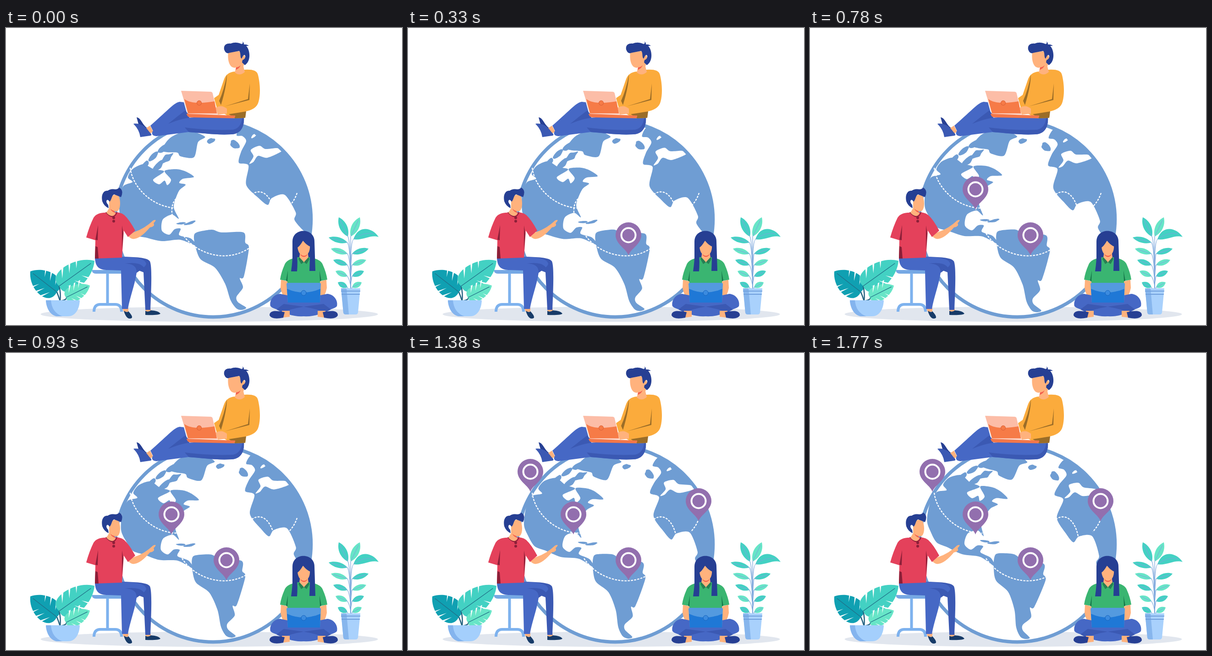
These frames come from a looping animation (864 px wide and 648 px high, 1.8 s). An HTML page:

```html
<!DOCTYPE html>
<html lang="en">
<head>
<meta charset="utf-8">
<title>Working around the globe</title>
<style>
html, body { margin: 0; width: 100%; height: 100%; overflow: hidden; background: #fff; }
svg { display: block; width: 100vw; height: 100vh; }
.skin { fill: #ffb27d; } .hair { fill: #263f93; } .pants { fill: #4668c5; } .fold { fill: #3b59b3; }
.blush { fill: #f4604d; } .ink { fill: #8b1f38; } .ochre { fill: #9b6d28; }
</style>
</head>
<body>
<svg viewBox="0 0 864 648" fill="none">
  <defs><clipPath id="disc"><circle cx="452" cy="417" r="215"/></clipPath></defs>

  <ellipse cx="443.5" cy="624.5" rx="368" ry="16.5" fill="#e1e6ee"/>
  <circle cx="452" cy="417" r="213.500" fill="#fff"/>
  <g clip-path="url(#disc)"><g id="land"></g></g>
  <circle cx="452" cy="417" r="213.500" stroke="#6f9dd3" stroke-width="7.500"/>
  <g stroke="#fff" stroke-width="2.300" stroke-dasharray="4.500 2.500">
    <path d="M271 305C276 348 320 393 376 393"/>
    <path d="M363 410Q358 382 375 369"/>
    <path d="M384 448C410 490 478 516 531 480"/>
    <path d="M536 363C559 347 579 368 585 400"/>
    <path d="M635 360Q630 376 617 390"/>
  </g>
  <g id="pins"></g>

  <g id="topMan">
    <path class="hair" d="M285 195C295 196 296 210 309 219L306 233L293 224Z"/>
    <path class="skin" d="M305 219L314 213L321 226L312 232Z"/>
    <path class="fold" d="M278 209C290 207 303 212 313 227Q321 234 314 235L293 238Q291 222 278 209Z"/>
    <path class="pants" d="M379 161C367 163 358 175 315 213L322 227L398 198L388 162Z"/>
    <path class="fold" d="M391 180Q372 194 354 209L402 202L398 188Z"/>
    <path class="pants" d="M519 193C521 216 512 231 492 232C459 234 425 229 398 227L328 236Q315 235 320 225Q380 194 412 195Z"/>
    <path class="fold" d="M519 196C520 216 512 231 492 232C459 234 431 229 399 227L390 217Q442 224 495 222Q513 218 515 197Z"/>
    <path d="M500 95C486 96 479 102 475 114L464 146L454 153L461 178L493 197L522 196L523 182C537 179 548 173 551 161C556 143 554 119 550 103C548 92 536 90 521 91Z" fill="#fbab3c"/>
    <path class="ochre" d="M482 101Q476 135 465 159L469 168Q482 125 482 101Z"/>
    <path class="ochre" d="M532 121L528 155L477 171L531 157ZM486 188L524 182L522 196L500 197Z"/>
    <path class="skin" d="M457 174Q470 166 482 176L482 187L462 189Z"/>
    <path d="M382 137L446 139Q450 139 451 143L461 188L397 187Z" fill="#fcbda7"/>
    <path d="M389 155C403 166 430 164 455 160L460 186L397 186Z" fill="#f67b47"/>
    <circle cx="421.500" cy="163.500" r="5" fill="#f67b47" stroke="#d75d35"/>
    <path d="M394 187L500 191Q501 195 496 197L402 195Q395 194 394 187Z" fill="#f3774a"/>
    <path class="skin" d="M485 53C483 67 486 80 493 85Q498 88 502 86L499 97Q510 106 521 96L518 84L523 66L515 50Z"/>
    <path class="blush" d="M502 86Q509 85 512 81Q509 89 501 91Z"/>
    <path class="hair" d="M476 47C474 36 483 33 490 34Q502 29 514 35Q518 34 516 29Q520 33 519 36Q525 35 530 39L524 39C533 48 535 73 521 81L515 75L516 70C526 66 522 54 517 61L514 67C510 64 513 55 509 50L488 54Q480 58 476 47Z"/>
  </g>

  <g id="seatedMan">
    <path d="M187 528H253V536H196Q188 536 187 528Z" fill="#76a8e4"/>
    <path d="M221.500 535V600M192 619Q192 603 206 603H238Q252 603 252 619" stroke="#7eb2ee" stroke-width="6"/>
    <path class="skin" d="M254 611H267V619H257ZM304 613H316V620H305Z"/>
    <path d="M257 617Q265 622 267 618Q278 630 274 633Q263 638 257 617ZM304 617Q310 621 316 616Q333 617 337 623Q334 627 304 626Z" fill="#173b68"/>
    <path class="fold" d="M196 500L254 499C281 500 308 500 314 509C319 521 317 567 315 615H304L300 533L287 528Z"/>
    <path class="pants" d="M194 502C195 521 203 528 222 528L251 529L253 613H266C270 588 281 561 285 534C291 527 303 524 306 515C304 501 277 501 254 499Z"/>
    <path class="fold" d="M285 534Q286 514 259 514Q292 509 301 523Z"/>
    <path class="skin" d="M265 452L280 445Q302 438 321 420Q328 417 326 421L322 426Q326 433 314 435Q295 458 280 460Q273 462 265 452Z"/>
    <path d="M222 403C207 402 197 405 191 414Q182 432 175 457L195 463L194 503L253 501L257 442L266 456L282 442Q269 418 258 408Q250 402 239 402Z" fill="#e4415b"/>
    <path class="ink" d="M201 430L195 462L200 463ZM195 476L200 478L202 503H194ZM253 431L256 449L253 485Z"/>
    <path d="M218 402Q235 421 242 402" stroke="#8b1f38" stroke-width="2"/>
    <circle class="ink" cx="235" cy="414" r="3"/><circle class="ink" cx="235" cy="421.500" r="3"/>
    <path class="skin" d="M225 366L244 363C251 374 250 393 245 398Q241 402 236 399L239 405Q231 416 219 403L225 393Z"/>
    <path class="blush" d="M236 399Q229 397 227 393Q230 401 238 403Z"/>
    <path class="hair" d="M210 378C207 363 213 354 222 355Q228 350 239 352Q246 351 246 348Q258 353 251 369L236 363C230 365 231 375 226 379C221 370 215 378 223 386L224 393Q214 389 210 378Z"/>
  </g>

  <g id="woman">
    <path class="hair" d="M625 530V466C625 435 673 435 673 466V530Z"/>
    <g id="womanHalf">
      <path class="skin" d="M600 549L614 553L615 578L625 590L612 594Q602 584 599 567Z"/>
      <path d="M650 500H638C621 503 611 508 608 516Q600 534 598 549L614 552V562H650Z" fill="#3ab571"/>
      <path d="M615 529L614 553L611 551Z" fill="#16754a"/>
      <path class="pants" d="M577 607C574 594 584 581 598 580Q624 584 650 598V629Q632 630 617 625C607 613 587 617 577 607Z"/>
      <path class="fold" d="M606 602L650 608Q620 613 603 621L590 614Z"/>
      <path class="skin" d="M602 617H619V630L603 632Z"/>
      <path class="hair" d="M575 627C575 616 588 616 608 620L605 632Q580 637 575 627Z"/>
    </g>
    <use href="#womanHalf" transform="translate(1299 0) scale(-1 1)"/>
    <path d="M612 559Q612 556 615 556H684Q687 556 687 559L685 599H615Z" fill="#549adf"/>
    <path d="M613 569Q649 585 686 569L685 599H615Z" fill="#1f78d6"/>
    <circle cx="649.500" cy="578" r="5.500" fill="#3b8bdf" stroke="#1763bb"/>
    <path class="skin" d="M642 487H658L660 501L650 512L640 501Z"/>
    <path class="blush" d="M642 491Q650 499 658 491L657 496Q650 503 643 496Z"/>
    <path class="skin" d="M636 475L648 464L663 473C664 485 660 496 650 497C640 496 636 485 636 475Z"/>
    <path d="M640 500L650 511L644 515L638 504ZM660 500L650 511L656 515L662 504Z" fill="#267f54"/>
    <path class="hair" d="M648 464Q640 478 634 480Q637 508 635 531H622Q627 498 625 466ZM648 464Q656 474 664 477L662 530H675L673 466Z"/>
  </g>

  <g id="leftPlant"></g>
  <path d="M87 594H161C160 616 150 629 135 629H112C98 628 88 613 87 594Z" fill="#a4cffc"/>
  <path d="M87 594H98Q100 621 123 629H112C98 628 88 613 87 594Z" fill="#84b4ee"/>
  <g id="rightPlant"></g>
  <path d="M731 568H773L768 621Q767 625 763 625H741Q737 625 736 621Z" fill="#a9d1fc"/>
  <path d="M731 568H743L748 625H741Q737 625 736 621Z" fill="#87b6ed"/>
  <path d="M731 574H773M732 581H772" stroke="#6f9fdc" stroke-width="2"/>
</svg>
<script>
const LOOP = 1800, STEP = 30, DEG_PER_MS = 0.0072;
const GLOBE = { x: 452, y: 416 };
const LAND = "#6f9dd3", SEA = "#fff", TEAL = "#10a0b2", AQUA = "#43d1c3", MINT = "#67e5c7", VEIN = "#7ba6dc";
const NS = "http://www.w3.org/2000/svg";
const byId = id => document.getElementById(id);
const polar = (angle, r) => [r * Math.cos(angle), r * Math.sin(angle)];

function add(parent, tag, attrs) {
  const el = document.createElementNS(NS, tag);
  for (const key in attrs) el.setAttribute(key, attrs[key]);
  return parent.appendChild(el);
}

// Closed, lightly rounded outline through the given points.
function outline(pts) {
  const at = i => pts[(i + pts.length) % pts.length];
  const handle = (i, sign) => [0, 1].map(k => at(i)[k] + sign * (at(i + 1)[k] - at(i - 1)[k]) / 7);
  return "M" + pts[0] + pts.map((_, i) => `C${handle(i, 1)} ${handle(i + 1, -1)} ${at(i + 1)}`).join("") + "Z";
}

let seed = 7;
const random = () => (seed = seed * 16807 % 2147483647) / 2147483647;
const land = byId("land");

function coast(text, fill = LAND) {
  add(land, "path", { d: outline(text.split(" ").map(p => p.split(",").map(Number))), fill });
}

// Ragged ellipse.
function islet(x, y, rx, ry, tilt, fill = LAND) {
  const pts = Array.from({ length: 9 }, (_, i) => {
    const [c, s] = polar(i / 9 * 2 * Math.PI, .75 + random() * .45);
    return [c * rx, s * ry];
  });
  add(land, "path", { d: outline(pts), fill, transform: `translate(${x} ${y}) rotate(${tilt})` });
}

// North America, South America, Greenland, Europe with Africa, Mediterranean
coast("249,410 247,372 256,345 276,336 266,326 276,308 300,297 322,308 345,313 321,331 334,341 346,333 352,343 360,331 346,312 372,308 392,313 410,325 386,329 378,338 392,342 377,356 366,390 377,416 362,407 342,418 340,442 356,451 368,439 381,438 378,452 403,459 415,475 380,462 340,465 304,457 280,452 262,432");
coast("410,456 416,446 449,440 470,446 518,446 522,468 530,480 519,542 510,546 517,566 503,586 506,598 524,610 515,615 503,612 490,594 478,558 456,523 425,505 414,480");
coast("340,266 358,240 396,224 434,237 419,249 410,282 381,280 374,272 352,271");
coast("503,234 512,214 540,200 620,240 690,330 690,452 658,449 630,420 632,402 608,364 580,371 571,386 551,371 524,342 529,300 508,294 513,270 524,247 516,236");
coast("531,296 540,280 534,266 553,257 566,264 592,262 601,269 570,283 550,279 540,292", SEA);
islet(540, 236, 6, 3, -40, SEA);
islet(447, 246, 10, 5, -25);
islet(499, 254, 12, 7, 35);
islet(382, 426, 10, 2.5, -8);
islet(402, 425, 13, 3, -18);
for (const [r, first, count, size] of [[188, 217, 3, 15], [166, 223, 2, 17]]) {
  for (let i = 0; i < count; i++) {
    const angle = first + i * 9, [x, y] = polar(angle * Math.PI / 180, r);
    islet(GLOBE.x + x, GLOBE.y + y, size, size * .4, angle + 90);
  }
}

const pins = [[481, 496, 330], [361, 396, 780], [634, 367, 1080], [267, 303, 1380]].map(([x, y, start]) => {
  const g = add(byId("pins"), "g", { transform: `translate(${x} ${y})` });
  add(g, "path", { d: "M0 0C-4 -14 -28 -24 -28 -44A28 28 0 0 1 28 -44C28 -24 4 -14 0 0Z", fill: "#926fae" });
  add(g, "circle", { cy: -44, r: 15.5, stroke: "#fff", "stroke-width": 4 });
  return { g, start };
});

// Group whose x axis runs from leaf base to tip.
function leafFrame(parent, x, y, tipX, tipY) {
  const dx = tipX - x, dy = tipY - y;
  const g = add(parent, "g", { transform: `translate(${x} ${y}) rotate(${Math.atan2(dy, dx) * 180 / Math.PI})` });
  return [g, Math.hypot(dx, dy)];
}

function splitLeaf(x, y, tipX, tipY, w, fill) {
  const parent = byId("leftPlant");
  add(parent, "path", { d: `M118 596Q${x + 4} ${(y + 596) / 2} ${x} ${y}`, stroke: "#22627f", "stroke-width": 2.5 });
  const [g, len] = leafFrame(parent, x, y, tipX, tipY);
  add(g, "path", { d: `M0 0C${-len * .1} ${w * 1.4} ${len * .7} ${w * 1.3} ${len} 0C${len * .7} ${-w * 1.3} ${-len * .1} ${-w * 1.4} 0 0Z`, fill });
  for (const side of [-1, 1]) {
    for (let i = 0; i < 3; i++) {
      const at = len * (.16 + i * .2);
      add(g, "path", { d: `M${at} ${side * w * .35}L${at + len * .14} ${side * w * 1.2}h${len * .07}Z`, fill: "#fff" });
    }
  }
  add(g, "path", { d: `M0 0H${len * .9}`, stroke: "#216f88", "stroke-width": 1.3 });
}
splitLeaf(111, 576, 53, 531, 27, TEAL);
splitLeaf(116, 563, 193, 508, 27, AQUA);
splitLeaf(131, 588, 183, 562, 17, MINT);

const rightPlant = byId("rightPlant");
function leaf(x, y, tipX, tipY, w, fill) {
  add(rightPlant, "path", { d: `M752 568Q752 ${y + 12} ${x} ${y}`, stroke: VEIN, "stroke-width": 1.2 });
  const [g, len] = leafFrame(rightPlant, x, y, tipX, tipY);
  add(g, "path", { d: `M0 0C${len * .3} ${w} ${len * .7} ${w} ${len} 0C${len * .7} ${-w} ${len * .3} ${-w} 0 0Z`, fill });
  add(g, "path", { d: `M0 0H${len * .85}`, stroke: VEIN });
}
for (const side of [-1, 1]) {
  leaf(749 + side * 3, 455, 749 + side * 23, 413, 11, side < 0 ? AQUA : MINT);
  for (let i = 0; i < 5; i++) {
    const y = 457 + i * 24.5;
    if (side < 0 || i) leaf(750 + side * 5, y + 11, 750 + side * (46 - i * 5), y, 8, (i + (side > 0)) % 2 ? MINT : AQUA);
  }
}
add(rightPlant, "path", { d: "M758 461C768 430 798 434 813 456C795 450 780 464 758 461Z", fill: AQUA });
add(rightPlant, "path", { d: "M752 568Q750 470 758 461Q780 444 802 449", stroke: VEIN });

function draw(t) {
  land.setAttribute("transform", `rotate(${t * DEG_PER_MS} ${GLOBE.x} ${GLOBE.y})`);
  for (const { g, start } of pins) g.setAttribute("visibility", t >= start ? "visible" : "hidden");
}

let origin;
function tick(now) {
  origin ??= now;
  draw(Math.floor(((now - origin) % LOOP) / STEP) * STEP);
  requestAnimationFrame(tick);
}
draw(0);
requestAnimationFrame(tick);
</script>
</body>
</html>
```
